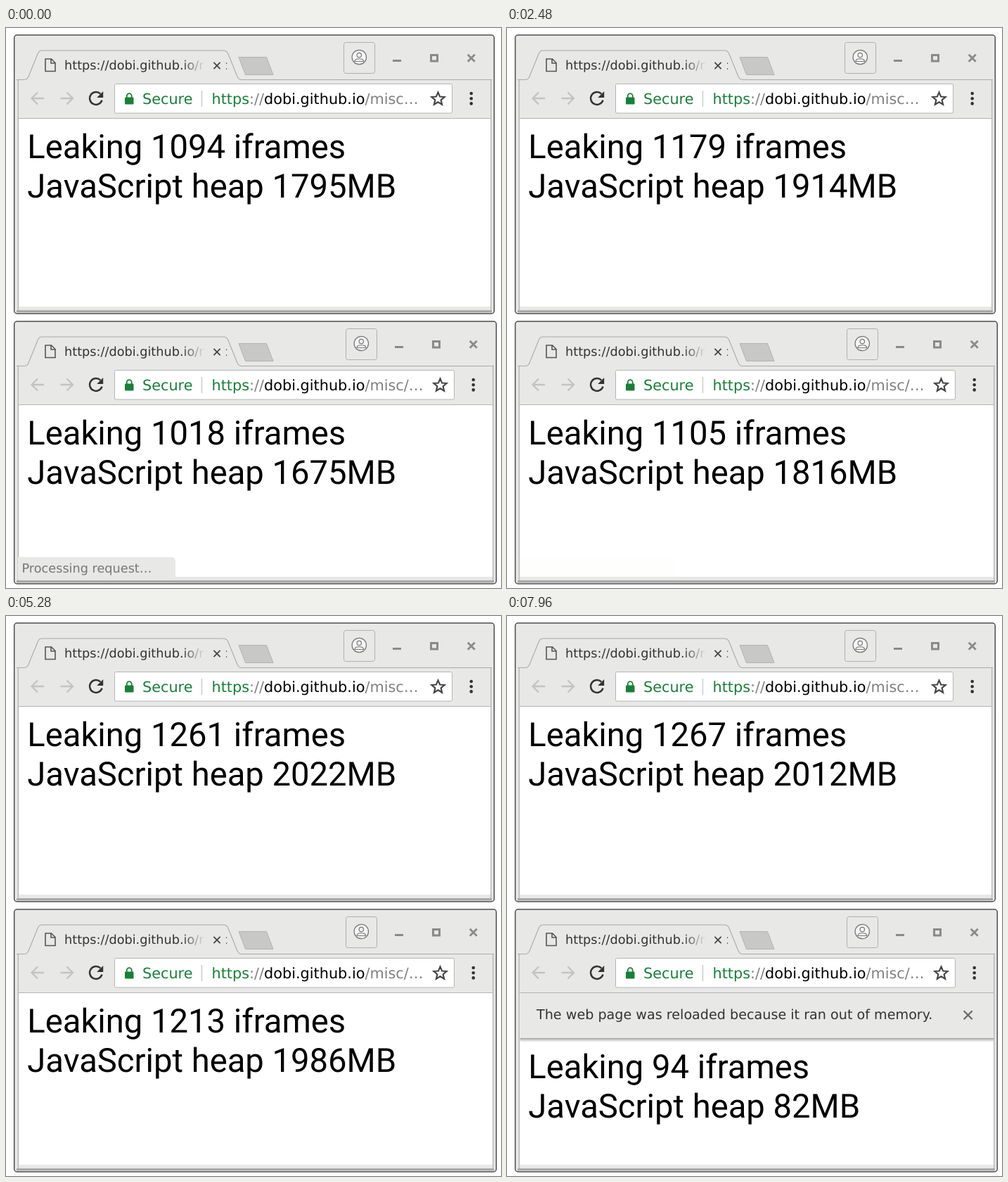
Animation of 704x796 px, one loop 8 s. Source, as an HTML page:

```html
<!DOCTYPE html>
<html lang="en">
<head>
<meta charset="utf-8">
<title>Leaking iframes</title>
<style>
  html, body { margin: 0; width: 100%; height: 100%; overflow: hidden; background: #fff; }
  svg { display: block; width: 704px; height: 796px; }
  text { font-family: "DejaVu Sans", sans-serif; text-rendering: geometricPrecision; }
  .page { font: 47.2px Roboto, sans-serif; }
  .url { font-size: 20.8px; }
  .small { font-size: 17.7px; }
</style>
</head>
<body>
<svg id="stage" viewBox="0 0 704 796">
  <defs>
    <linearGradient id="fade"><stop stop-color="#e8e8e7" stop-opacity="0"/><stop offset="1" stop-color="#e8e8e7"/></linearGradient>
    <linearGradient id="shade" x2="0" y2="1"><stop stop-color="#999"/><stop offset=".35" stop-color="#ccc"/><stop offset="1" stop-color="#fff"/></linearGradient>
  </defs>
</svg>
<script>
const LOOP = 8000, RELOAD = 6000, CHROME = '#e8e8e7', BAR = 65;
const stage = document.getElementById('stage');
const get = id => document.getElementById(id);

const cross = (x, y, r, color, width) =>
  `<path d="M${x - r} ${y - r}l${2 * r} ${2 * r}m0 ${-2 * r}l${-2 * r} ${2 * r}" stroke="${color}" stroke-width="${width}"/>`;

const star = (x, y) => Array.from({ length: 10 }, (_, i) => {
  const r = i % 2 ? 4.3 : 9.6, a = (i / 5 - .5) * Math.PI;
  return [x + r * Math.cos(a), y + r * Math.sin(a)];
}).join(' ');

const arrow = (x, dir) =>
  `<path d="M${x + 9 * dir} 100H${x - 8 * dir}m${8 * dir} -8.5l${-8.5 * dir} 8.5l${8.5 * dir} 8.5" stroke="#c3c3c3" stroke-width="2.3"/>`;

// A browser window; the parts on the right move with its extra width.
const browser = (id, top, height, extra, tail, overlay = '') => `
<g transform="translate(0 ${top})" fill="none">
  <rect x="11.7" y="10" width="${682.6 + extra}" height="${height}" rx="4" fill="${CHROME}" stroke="#4e4e4e" stroke-width="1.5"/>
  <path d="M17.3 74V${height + 8}M${689.7 + extra} 74V${height + 8}" stroke="#b9b9b9" stroke-width="1.5"/>
  <path d="M15 ${height + 6.8}H${691 + extra}" stroke="#a4a4a4" stroke-width="3"/>
  <rect x="18.5" y="128" width="${670.5 + extra}" height="${height - 128}" fill="#fff"/>
  <g id="page${id}" fill="#000">
    <text class="page" x="30.3" y="185" id="count${id}"></text>
    <text class="page" x="30.3" y="241" id="heap${id}"></text>
  </g>
  ${overlay}
  <path d="M18 128.5H${689 + extra}" stroke="#b4b4b4"/>
  <path d="M15 73.5H26Q30 73.5 32 69L45 37Q47 32 51 32H309Q314 32 316 37L329 69Q331 73.5 335 73.5H${691 + extra}" stroke="#aaa" stroke-width="1.1"/>
  <path d="M331 41.500H370.500L380 66.500H340.500Z" fill="#c8c8c7" stroke="#b3b3b3" stroke-linejoin="round"/>
  <path d="M56 44H64.500L70 49.500V61.500H56ZM64 44V50H70" stroke="#555" stroke-width="1.6"/>
  <text class="small" x="83" y="59" fill="#333">https://dobi.github.io/misc</text>
  <rect x="250" y="42" width="33" height="26" fill="url(#fade)"/>
  <rect x="282" y="42" width="31" height="26" fill="${CHROME}"/>
  ${cross(300, 53.5, 4.6, '#444', 1.8)}
  ${arrow(45, 1)}${arrow(86.5, -1)}
  <path d="M134.3 93.7A8.9 8.9 0 1 0 136.5 102.6" stroke="#333" stroke-width="2.5"/>
  <path d="M138.2 90V99H129.200Z" fill="#333"/>
  <rect x="154.5" y="79.5" width="${480 + extra}" height="41.5" rx="2" fill="#fff" stroke="#b5b5b5"/>
  <rect x="169" y="98.5" width="12.5" height="10" rx="1.2" fill="#188038"/>
  <path d="M171.8 99V96.5a3.45 3.45 0 0 1 6.9 0V99" stroke="#188038" stroke-width="1.8"/>
  <text class="url" x="194" y="108" fill="#188038">Secure</text>
  <path d="M278.5 89V112" stroke="#bbb"/>
  <text class="url" x="292.5" y="108" fill="#808080"><tspan fill="#188038">https</tspan>://<tspan fill="#000">dobi.github.io</tspan>/${tail}</text>
  <g transform="translate(${extra})">
    <rect x="480.5" y="20.5" width="44" height="44" rx="3" stroke="#b0b0b0"/>
    <g stroke="#777" stroke-width="1.2">
      <circle cx="502.3" cy="41.5" r="10.2" fill="#f4f4f4"/>
      <circle cx="502.3" cy="38.5" r="3.2"/>
      <path d="M496 47.5C496 42.5 508.6 42.5 508.6 47.5Z"/>
    </g>
    <g stroke="#8a8a8a" stroke-width="3">
      <path d="M550 46.5H562"/>
      <rect x="604.5" y="38.5" width="9" height="8.5"/>
    </g>
    ${cross(661.7, 42.7, 5, '#8a8a8a', 2.8)}
    <polygon points="${star(614.5, 101)}" stroke="#444" stroke-width="2.1"/>
    ${[-1, 0, 1].map(i => `<circle cx="661.7" cy="${100.2 + 7.2 * i}" r="2.3" fill="#333"/>`).join('')}
  </g>
</g>`;

const overlay = `
  <g id="bar">
    <rect id="barBack" x="18.5" y="128" width="673.5" fill="${CHROME}"/>
    <rect id="barShade" x="18.5" width="673.5" height="6" fill="url(#shade)"/>
    <g id="barText">
      <text x="42" y="166" font-size="19.17" fill="#333">The web page was reloaded because it ran out of memory.</text>
      ${cross(655.7, 160.3, 6, '#666', 2.2)}
    </g>
  </g>
  <path id="bubble" d="M17 345H235Q241 345 241 351V377H17Z" fill="${CHROME}"/>
  <text id="status" class="small" x="22.5" y="367" fill="#777">Processing request…</text>`;

stage.insertAdjacentHTML('beforeend',
  browser('A', 0, 396, 0, 'misc…') + browser('B', 407, 373, 3, 'misc/…', overlay));

// Key points: time, then iframes and heap of the upper and the lower window.
const keys = [
  [0, 1094, 1795, 1018, 1675],
  [340, 1108, 1817, 1029, 1696],
  [1600, 1151, 1870, 1079, 1786],
  [3380, 1221, 1980, 1143, 1862],
  [4500, 1255, 2016, 1188, 1949],
  [RELOAD, 1266, 2028, 1238, 2022],
  [7960, 1267, 2012]];

const mix = (a, b, p) => a + (b - a) * p;

// Repaints come fast at first, pause, then go on at a slower beat.
function sample(time) {
  const beat = time < 1600 ? 28 : 187;
  if (time < 1600) time = Math.min(time, 540);
  const i = Math.min(keys.findLastIndex(k => k[0] <= time), keys.length - 2);
  const [a, b] = [keys[i], keys[i + 1]];
  const steps = Math.round((b[0] - a[0]) / beat);
  const p = Math.min(1, Math.floor((time - a[0]) / (b[0] - a[0]) * steps + 1e-6) / steps);
  return a.map((v, n) => mix(v, b[n], p));
}

function setCounts(id, count, heap) {
  get('count' + id).textContent = `Leaking ${Math.round(count)} iframes`;
  get('heap' + id).textContent = `JavaScript heap ${Math.round(heap)}MB`;
}

function draw(time) {
  const [t, countA, heapA, countB, heapB] = sample(time);
  const since = (t - RELOAD) / 1000, reloaded = since >= 0;
  setCounts('A', countA, heapA);
  if (reloaded) setCounts('B', 1 + 47.4 * since, 7 + 38.3 * since);
  else setCounts('B', countB, heapB);

  const shown = Math.max(0, 1 - t / 320);
  get('status').setAttribute('opacity', shown);
  get('bubble').setAttribute('opacity', t < 2660 ? Math.max(shown, .08) : 0);

  const drop = reloaded ? Math.min(BAR, 18 + 250 * since) : 0;
  get('bar').style.display = reloaded ? '' : 'none';
  get('barBack').setAttribute('height', drop);
  get('barShade').setAttribute('y', 128 + drop);
  get('barText').style.display = drop === BAR ? '' : 'none';
  get('pageB').setAttribute('transform', `translate(0 ${drop})`);
}

const start = performance.now();
function loop() {
  draw((performance.now() - start) % LOOP);
  requestAnimationFrame(loop);
}
loop();
</script>
</body>
</html>
```
